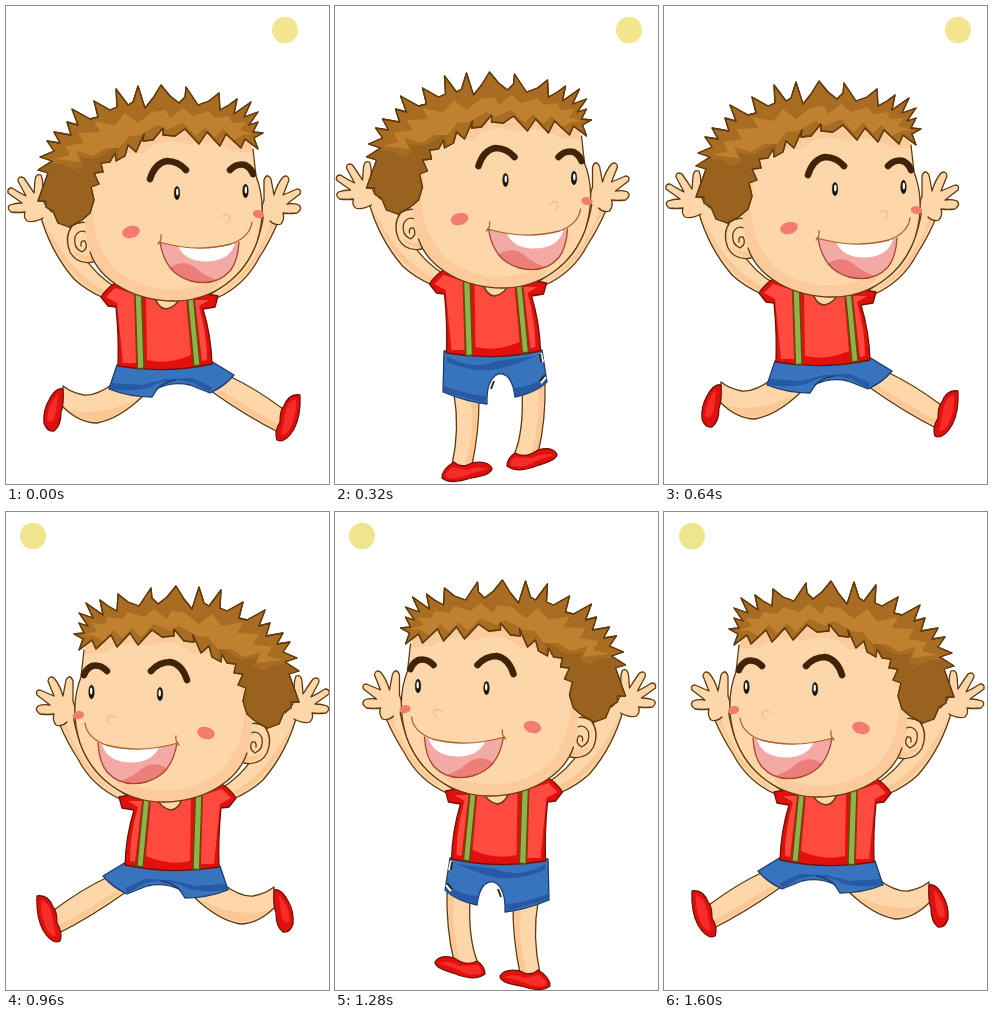
Animation, 323 px wide and 478 px high, one loop 1.92 s. Source, as an HTML page:

```html
<!DOCTYPE html>
<html lang="en">
<head>
<meta charset="utf-8">
<title>Jumping boy</title>
<style>
html, body { margin: 0; width: 100%; height: 100%; overflow: hidden; background: #fff; }
svg { display: block; width: 323px; height: 478px; }
.line { fill: none; stroke: #603a0c; stroke-width: 1.3; stroke-linecap: round; stroke-linejoin: round; }
.skin { fill: #fdd6a9; }
.shade { fill: #fbc794; }
.navy { fill: #2859a5; }
.red { fill: #ff4a3f; }
.shine { fill: #f42d28; }
.skin.line { fill: #fdd6a9; }
.blue.line { fill: #3873bd; stroke: #1d3c70; }
.crimson.line { fill: #e1100f; stroke: #6d1205; }
.green.line { fill: #92b248; stroke: #4f5312; }
.hair.line { fill: #a86c22; }
</style>
</head>
<body>
<svg viewBox="0 0 323 478">
  <defs>
    <path id="faceShape" d="M88 158C76 180 76 221 84 246C94 276 130 295 168 295C206 295 238 272 251 236C258 214 258 190 250 170L245 135L200 110L130 115Z"/>
    <clipPath id="faceClip"><use href="#faceShape"/></clipPath>
    <path id="hairShape" d="M63 221L52 217L47 205L40 201L40 195L32 195L37 181L42 167L32 164L46 155L34 151L48 145L41 135L54 137L48 126L65 129L61 116L72 119L66 103L84 113L92 111L88 95L104 104L111 101L110 83L122 99L127 96L132 80L139 102L147 92L155 79L164 90L173 97L179 91L180 81L192 99L203 95L213 87L214 104L223 99L231 93L228 108L245 96L238 111L252 106L243 119L252 116L247 126L257 127L248 132L252 143L239 133L235 142L220 128L214 140L201 126L193 138L179 123L169 130L157 129L157 122L147 134L137 135L138 128L130 146L122 139L119 150L110 155L109 147L104 156L95 157L97 166L88 167L93 178L85 181L88 194L84 207L76 214Z"/>
    <clipPath id="hairClip"><use href="#hairShape"/></clipPath>
  </defs>

  <ellipse id="sun" cy="24" rx="13" ry="13.3"/>

  <g id="boy">
    <g id="run">
      <path class="skin line" d="M108 377Q91 390 78 389Q66 387 57 380L56 400Q73 417 91 417Q113 413 137 390Z"/>
      <path class="shade" d="M63 404Q78 416 92 415Q112 411 130 393Q97 411 63 404Z"/>
      <path class="skin line" d="M223 370Q249 382 277 403L274 427Q240 410 205 385Z"/>
      <path class="shade" d="M211 386Q242 409 273 424L274 419Q242 403 215 384Z"/>
      <path class="crimson line" d="M57 383Q50 381 43 394Q37 404 38 417Q41 426 48 425Q55 420 55 406Q58 399 57 383Z"/>
      <path class="shine" d="M52 388Q42 398 41 414Q47 419 50 407Z"/>
      <path class="crimson line" d="M294 389Q283 387 278 400Q274 404 274 416Q268 426 271 434Q279 438 288 423Q295 410 294 389Z"/>
      <path class="shine" d="M290 393Q281 395 279 409L275 429Q282 430 286 418Q291 406 290 393Z"/>
      <path class="blue line" d="M111 359L103 383Q123 391 146 391L152 382Q168 375 184 379L204 387Q219 380 228 369L205 355Z"/>
      <path class="navy" d="M104 383Q125 386 142 382L150 378Q171 371 187 377L204 386L206 381L186 372L160 373L136 379L106 377Z"/>
      <path class="line" style="stroke:#1d3c70" d="M151 383Q158 376 170 374"/>
    </g>

    <g id="stand">
      <path class="skin line" d="M119 388Q125 423 117 459Q126 465 137 459Q144 426 144 394Z"/>
      <path class="shade" d="M136 397L143 397Q142 428 136 457L130 459Q140 428 136 397Z"/>
      <path class="skin line" d="M187 384Q189 426 179 449Q190 455 203 447Q211 415 210 374Z"/>
      <path class="shade" d="M203 382L209 379Q209 416 202 446L196 449Q206 416 203 382Z"/>
      <path class="crimson line" d="M119 456Q107 463 107 472Q115 479 136 472Q157 469 157 462Q152 454 137 457Q126 463 119 456Z"/>
      <path class="shine" d="M118 461Q109 467 111 471Q119 475 134 468L153 463Q143 459 132 464Z"/>
      <path class="crimson line" d="M180 447Q172 452 172 460Q183 468 204 459Q222 454 222 448Q217 440 203 444Q190 453 180 447Z"/>
      <path class="shine" d="M180 451Q173 457 177 460Q187 463 201 455L218 449Q208 446 197 452Z"/>
      <path class="blue line" d="M109 345L108 386Q132 396 152 398Q151 374 163 368Q177 366 180 391Q200 387 212 376L207 344Z"/>
      <path class="navy" d="M109 380Q133 389 151 390L150 397L109 386ZM179 382Q196 381 211 371L212 376Q200 387 180 390ZM112 350Q136 365 162 355L201 350L175 360Q145 370 112 356Z"/>
      <path d="M206 347L208 356M211 371L206 377" fill="none" stroke="#fff" stroke-width="2"/>
      <path d="M205 348L206 356M210 369L205 375M159 375L156 383" fill="none" stroke="#382a18" stroke-width="2"/>
    </g>

    <g id="upper">
      <path class="skin line" d="M34 208Q44 245 68 273Q81 285 98 292L112 283Q88 268 78 250L54 201Z"/>
      <path class="shade" d="M38 216Q48 247 70 271Q83 283 98 290L102 286Q67 272 38 216Z"/>
      <path class="skin line" d="M258 208Q252 244 235 264Q222 278 198 292L211 292Q239 279 253 252Q264 235 272 216Z"/>
      <path class="shade" d="M211 289Q240 274 253 249L270 216L266 214Q252 260 211 289Z"/>
      <path class="skin line" d="M46 206Q36 198 36 188Q38 176 35 169Q30 167 29 174L28 187Q23 179 18 172Q12 169 12 175L20 190Q12 186 6 182Q1 182 2 187L16 197Q9 197 4 199Q0 202 5 206Q13 207 19 206Q17 211 21 215Q28 217 37 212"/>
      <path class="skin line" d="M257 211Q254 204 258 194L258 174Q261 166 265 173L268 189Q271 178 277 171Q282 168 283 174L277 189Q284 186 291 183Q296 183 294 188L281 198Q288 197 293 199Q297 203 291 207Q283 208 277 207Q279 213 275 218Q269 220 264 215"/>

      <path class="crimson line" d="M109 277Q100 283 95 291L102 300L110 301Q113 331 112 360Q159 368 206 358Q205 329 197 303L209 301L212 290L190 286Z"/>
      <path class="red" d="M109 282L100 291L111 297L117 357L130 357L128 288ZM140 290L148 291Q160 308 175 292L180 293L185 349Q162 359 141 354ZM189 294L203 294L193 300Q201 328 201 354L196 355Z"/>
      <path class="skin line" d="M148 288Q151 302 160 303Q171 301 176 288Z"/>
      <path class="green line" d="M129 286L135.500 286L138 362L131.500 363Z"/>
      <path class="green line" d="M181 287L187 287L194 359L188 360Z"/>

      <path class="skin line" d="M89 221Q77 212 66 220Q58 231 64 246Q71 259 87 256Z"/>
      <path class="shade" d="M67 244Q76 252 87 249V255Q74 256 67 244Z"/>
      <path class="line" d="M82 227Q73 222 69 231Q67 242 76 246Q83 242 79 235Q74 234 75 240"/>
      <use href="#faceShape" class="skin"/>
      <g clip-path="url(#faceClip)">
        <path class="shade" d="M80 145Q96 166 87 194Q84 236 110 264Q154 299 218 271L190 301H100L70 250ZM90 162Q116 142 137 148Q155 129 181 139Q211 132 225 145L249 147V120H110Z" opacity=".65"/>
      </g>
      <path class="line" d="M84 246C94 276 130 295 168 295C206 295 238 272 251 236C258 214 258 190 250 170L247 143"/>

      <use href="#hairShape" class="hair line"/>
      <g clip-path="url(#hairClip)">
        <path fill="#9a621f" d="M28 156L58 158L68 164L78 159L73 151L90 153L112 140L113 156L96 184L90 224H28Z"/>
        <path fill="#bf802f" d="M48 153L64 149L59 140L78 137L72 127L94 126L88 115L109 119L119 107L132 117L146 106L160 104L164 112L177 102L187 110L203 105L209 112L223 110L226 117L240 116L234 124L248 128L237 129L228 134L217 123L209 131L199 121L190 130L177 117L161 124L152 119L134 129L123 130L113 142L100 142L87 150L70 145L75 156Z"/>
      </g>
      <use href="#hairShape" class="line"/>

      <g fill="none" stroke="#412307" stroke-width="6.6" stroke-linecap="round">
        <path d="M144 173Q149 157 161 155Q172 155 180 164"/>
        <path d="M224 164Q231 157 239 159Q245 162 247 168"/>
      </g>
      <g fill="#19130d" stroke="#19130d" stroke-width=".6">
        <ellipse cx="171" cy="187" rx="2.7" ry="6.6"/>
        <ellipse cx="239.500" cy="185" rx="2.7" ry="6.8"/>
      </g>
      <g fill="#fff">
        <ellipse cx="171.300" cy="186" rx="1.2" ry="3.5"/>
        <ellipse cx="239.800" cy="184" rx="1.2" ry="3.5"/>
      </g>
      <path d="M215 211Q221 206 224 211Q224 215 220 217" fill="none" stroke="#f4bd86" stroke-width="1.3"/>
      <ellipse cx="125" cy="226" rx="9" ry="6" transform="rotate(-15 125 226)" fill="#f47b70"/>
      <ellipse cx="252.500" cy="208" rx="5.700" ry="4" transform="rotate(12 252 208)" fill="#f47b70"/>

      <path d="M154 236Q159 268 185 275Q209 281 224 265Q232 255 233 236Q195 250 154 236Z" fill="#f4aaa4"/>
      <path d="M163 262Q178 252 191 263Q199 270 211 274Q203 278 185 275Q171 271 163 262Z" fill="#ec7f79"/>
      <path d="M172 240Q201 245 229 237Q225 252 207 255Q180 258 172 240Z" fill="#fff"/>
      <path class="line" style="stroke:#a7442f" d="M154 236Q159 268 185 275Q209 281 224 265Q232 255 233 236"/>
      <path class="line" style="stroke:#a7602b" d="M155 229Q156 234 152 238M153 236Q191 247 225 238Q244 231 246 216"/>
    </g>
  </g>
</svg>
<script>
const STEP = 320;
// mirror: sum of an x and its reflection, or 0 when facing right
const poses = [
  { pose: "run", mirror: 0, dy: 0, sun: 279 },
  { pose: "stand", mirror: 0, dy: 0, sun: 294 },
  { pose: "run", mirror: 0, dy: -4, sun: 294 },
  { pose: "run", mirror: 325, dy: -5, sun: 27 },
  { pose: "stand", mirror: 322, dy: 2, sun: 27 },
  { pose: "run", mirror: 322, dy: -10, sun: 28 }
];
const el = id => document.getElementById(id);

function draw(time) {
  const { pose, mirror, dy, sun } = poses[Math.floor(time / STEP) % poses.length];
  const standing = pose === "stand";
  el("run").style.display = standing ? "none" : "";
  el("stand").style.display = standing ? "" : "none";
  el("upper").setAttribute("transform", standing ? "translate(-.5 -13)" : "");
  el("boy").setAttribute("transform", `translate(${mirror} ${dy}) scale(${mirror ? -1 : 1} 1)`);
  el("sun").setAttribute("cx", sun);
  el("sun").setAttribute("fill", mirror ? "#f0e58f" : "#f4e58f");
}

const start = performance.now();
function tick() {
  draw(performance.now() - start);
  requestAnimationFrame(tick);
}
tick();
</script>
</body>
</html>
```
